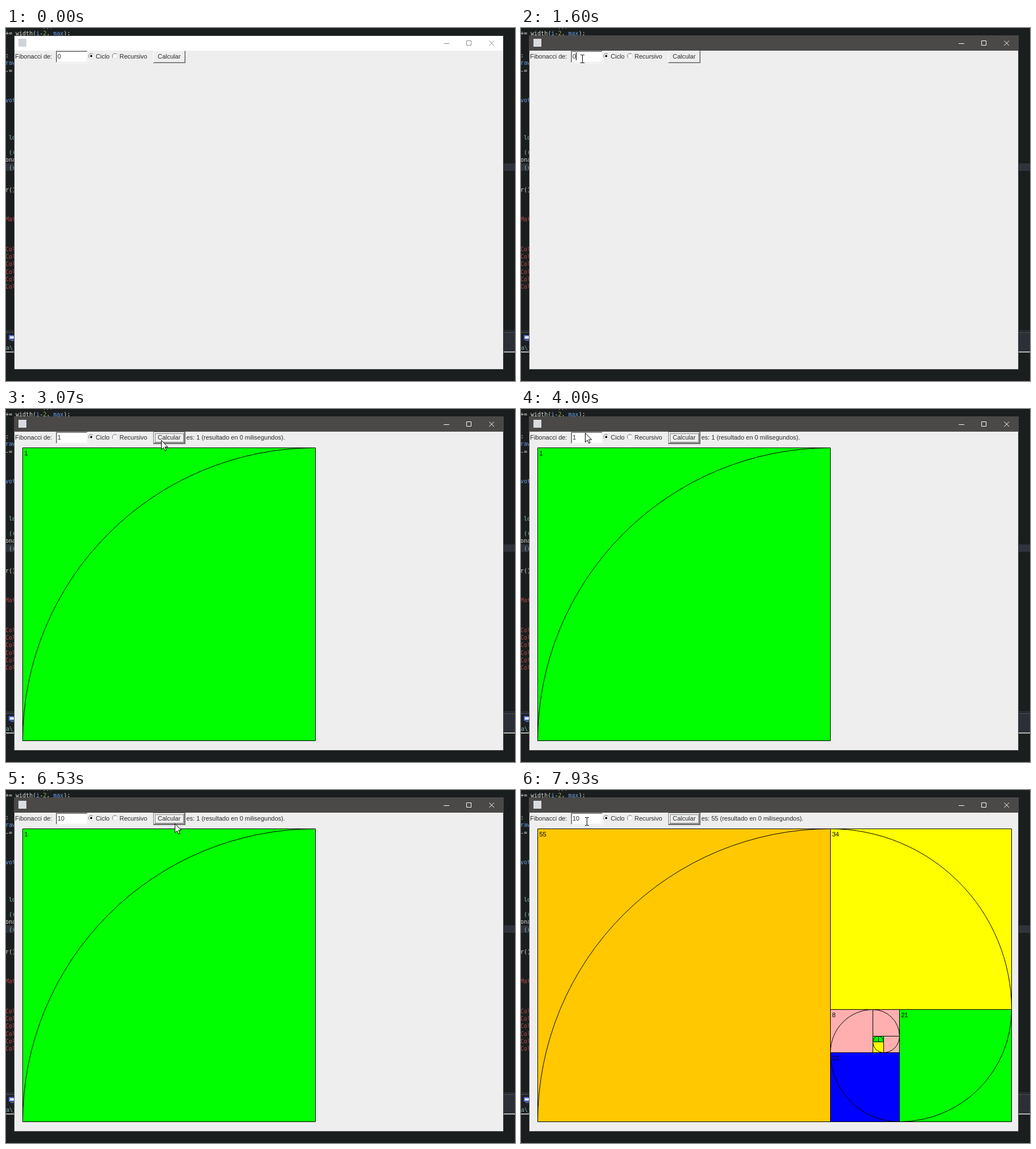
Animation, 899 px wide and 623 px high, one loop 8000 ms. Source, as an HTML page:

```html
<!DOCTYPE html>
<html lang="es">
<head>
<meta charset="utf-8">
<style>
html, body { margin: 0; width: 100%; height: 100%; overflow: hidden; background: #1b1e1f; }
svg { display: block; }
text { font: 11px "Liberation Sans", Arial, sans-serif; fill: #2a2a2a; white-space: pre; }
.code text { font: 10px "DejaVu Sans Mono", monospace; }
</style>
</head>
<body>
<svg width="899" height="623" viewBox="0 0 899 623">
  <g id="editor" class="code"></g>
  <g id="app"></g>
</svg>
<script>
const LOOP = 8000, STEP = 200 / 3;
const rect = (x, y, w, h, fill) => `<rect x="${x}" y="${y}" width="${w}" height="${h}" fill="${fill}"/>`;
const line = (d, color, extra = '') => `<path d="${d}" fill="none" stroke="${color}" ${extra}/>`;
const label = (x, y, s, color) => `<text x="${x}" y="${y}"${color ? ` style="fill:${color}"` : ''}>${s}</text>`;

// Two-pixel bevel: outer and inner colours for top-left, then bottom-right
function bevel(x, y, w, h, fill, [a, b, c, d]) {
  return rect(x, y, w, h, c) + rect(x, y, w - 1, h - 1, a) +
    rect(x + 1, y + 1, w - 2, h - 2, d) + rect(x + 1, y + 1, w - 3, h - 3, b) +
    rect(x + 2, y + 2, w - 4, h - 4, fill);
}

function editor() {
  const white = '#dcdcd6', blue = '#6c9fe8', teal = '#8cc5bd', red = '#b94747';
  const rows = [[13, '+= width(', white], [52, ':', white], [65, 'raw', blue], [79, '-=', white],
    [131, 'vot', blue], [197, ' lo', teal], [223, ' ((', teal], [236, 'ona', white],
    [250, ' ((', teal], [289, 'r()', white], [341, 'Mat', red]];
  for (let i = 0; i < 6; i++) rows.push([394 + i * 13.2, 'Col', red]);
  const top = [[9, 'i', blue], [10, '-', white], [11, '2', '#8bb552'], [12, ',', white], [14, 'max', blue], [17, ');', white]];
  return rect(0, 0, 899, 623, '#1b1e1f') + rect(0, 239, 899, 13, '#30333b') +
    rect(0, 533, 899, 4, '#282b30') + rect(0, 537, 899, 1, '#4c4e58') +
    rect(0, 538, 899, 33, '#2d2f37') + rect(0, 538, 15, 19, '#1d2026') + rect(0, 557, 15, 14, '#1b1e1f') +
    rect(5, 542, 12, 8, '#5a70d8') + rect(7, 544, 9, 4, '#e4e9ff') + rect(8, 551, 8, 1, '#8795df') +
    rect(0, 571, 899, 1.5, '#e6e6e6') +
    label(47, 0, 'max));', white) +
    rows.map(([y, s, c]) => label(-1, y, s, c)).join('') +
    top.map(([i, s, c]) => label(-1 + i * 6.04, 13, s, c)).join('') +
    label(0, 568, 'a\\jo', '#86a9ad');
}

function radio(x, on) {
  return `<circle cx="${x}" cy="49.5" r="4.5" fill="#fafafa"/>` +
    line(`M${x - 3.2} 52.7A4.5 4.5 0 0 1 ${x + 3.2} 46.3`, '#686868') +
    line(`M${x - 3.2} 52.7A4.5 4.5 0 0 0 ${x + 3.2} 46.3`, '#dedede') +
    (on ? `<circle cx="${x}" cy="49.5" r="1.9" fill="#000"/>` : '');
}

function frame(active) {
  const ink = active ? '#fff' : '#8a8a8a';
  return rect(14, 13, 865, 590, active ? '#4a4a4a' : '#34383a') +
    rect(15, 14, 863, 26, active ? '#4b4947' : '#fff') + rect(15, 40, 863, 562, '#eee') +
    rect(22, 19, 14, 14, active ? '#d9dce0' : '#cfd4d9') +
    line('M773 27.5h10M813.5 22.5h8v8h-8zM853.5 22.5l8.5 8.5M862 22.5l-8.5 8.5', ink);
}

function button(focus, pressed) {
  const shift = pressed ? 1 : 0;
  const edges = pressed ? ['#696969', '#a0a0a0', '#696969', '#a0a0a0'] : ['#fff', '#eee', '#696969', '#a0a0a0'];
  let s = bevel(260, 40, 57, 22, '#eee', edges);
  if (focus) {
    s = rect(260, 40, 57, 22, '#777') + bevel(261, 41, 55, 20, '#eee', edges) +
      line(`M${263.5 + shift} ${43.5 + shift}h50v15h-50z`, '#222', 'stroke-dasharray="1 1"');
  }
  return s + label(268 + shift, 54 + shift, 'Calcular');
}

function field(value, caret, selected) {
  const w = value.length * 6.1;
  return bevel(88, 40, 57, 22, '#fff', ['#a0a0a0', '#696969', '#fff', '#e3e3e3']) +
    (selected ? rect(91, 44, w, 13, '#0078d7') : '') +
    label(91, 54, value, selected && '#fff') +
    (caret ? rect(91 + Math.round(w), 43, 1, 14, '#000') : '');
}

// Squares fill the left, top, right and bottom of the remaining area in turn
function spiral(count) {
  const fib = [1, 1];
  while (fib.length < count) fib.push(fib.at(-1) + fib.at(-2));
  const sizes = fib.slice(0, count).reverse();
  const fills = { 55: '#ffc800', 34: '#ff0', 21: '#0f0', 13: '#00f', 2: '#ff0', 1: '#0f0' };
  const unit = 517.55 / sizes[0];
  let x = 29, y = 68, w = count > 1 ? sizes[0] + sizes[1] : 1, h = sizes[0], out = '';
  sizes.forEach((n, i) => {
    const side = i % 4;
    const px = x + (side === 2 ? w - n : 0) * unit, py = y + (side === 3 ? h - n : 0) * unit;
    const l = Math.floor(px) + .5, t = Math.floor(py) + .5;
    const r = Math.floor(px + n * unit) + .5, b = Math.floor(py + n * unit) + .5;
    const ends = [[l, b, r, t], [l, t, r, b], [r, t, l, b], [r, b, l, t]][side];
    out += rect(l, t, r - l, b - t, fills[n] || '#ffafaf') + line(`M${l} ${t}H${r}V${b}H${l}z`, '#000') +
      line(`M${ends[0]} ${ends[1]}A${r - l} ${b - t} 0 0 1 ${ends[2]} ${ends[3]}`, '#000');
    if (n > 5 || count === 1) out += label(l + 3, t + 13.5, n, '#000');
    if (side % 2) { h -= n; if (side === 1) y += n * unit; }
    else { w -= n; if (side === 0) x += n * unit; }
  });
  return out;
}

// Pointer path: time, x, y
const path = [
  [530, 886, 376], [800, 560, 255], [1070, 250, 110], [1330, 119, 59], [1400, 110, 54], [1600, 108, 54],
  [1800, 108, 54], [2070, 60, 57], [2200, 62, 60], [2400, 130, 76], [2670, 264, 80], [2800, 274, 55],
  [3070, 274, 55], [3470, 268, 205], [3600, 268, 205], [3930, 84, 58], [4000, 113, 42], [4130, 113, 42],
  [4270, 113, 54], [4400, 110, 54], [4670, 57, 60], [5000, 88, 61], [5130, 92, 64], [5670, 177, 69],
  [5870, 249, 70], [6070, 285, 77], [6200, 309, 66], [6330, 298, 59], [6930, 298, 59], [7070, 336, 120],
  [7130, 320, 160], [7400, 112, 84], [7600, 112, 84], [7730, 103, 58], [7930, 116, 55], [8000, 116, 55]
];
const beamTimes = [[1265, 2260], [4200, 4940], [7730, 8000]];
const within = (t, a, b) => t >= a && t < b;

function pointer(t) {
  const i = path.findIndex(p => p[0] > t);
  if (i < 1) return '';
  const [t0, x0, y0] = path[i - 1], [t1, x1, y1] = path[i];
  const k = (t - t0) / (t1 - t0);
  const x = Math.round(x0 + (x1 - x0) * k), y = Math.round(y0 + (y1 - y0) * k);
  if (beamTimes.some(([a, b]) => within(t, a, b))) {
    return line(`M${x - 3} ${y - 6.5}h3l.5 .5.5-.5h3M${x + .5} ${y - 6}v13M${x - 3} ${y + 7.5}h3l.5-.5.5.5h3`, '#000');
  }
  return `<path transform="translate(${x + .5} ${y + .5})" d="M0 0V16L3.7 12.5 6.2 18 8.7 17 6.2 11.5H11.2z" fill="#fff" stroke="#000"/>`;
}

function app(t) {
  const value = t < 2260 ? '0' : t < 5730 ? '1' : '10';
  const focus = within(t, 2860, 4330) || t >= 6460;
  const pressed = within(t, 2860, 2930) || within(t, 6460, 6530);
  const selected = within(t, 1930, 2260) || within(t, 4530, 4800);
  const caret = t >= 1595 && !focus && !selected;
  const result = t >= 6660 ? 55 : t >= 2990 ? 1 : 0;
  return frame(t >= 1595) + label(16, 54, 'Fibonacci de:') + field(value, caret, selected) +
    radio(150.5, true) + label(158.5, 54, 'Ciclo') + radio(192.5, false) + label(200.5, 54, 'Recursivo') +
    button(focus, pressed) +
    (result ? label(318.5, 54, `es: ${result} (resultado en 0 milisegundos).`) : '') +
    (result === 55 ? spiral(10) : t >= 3060 ? spiral(1) : '') + pointer(t);
}

const $ = id => document.getElementById(id);
$('editor').innerHTML = editor();
let last = -1;
const start = performance.now();
function tick() {
  const t = (performance.now() - start) % LOOP;
  const step = Math.floor((t + 3.4) / STEP);
  if (step !== last) $('app').innerHTML = app((last = step) * STEP);
  requestAnimationFrame(tick);
}
tick();
</script>
</body>
</html>
```
